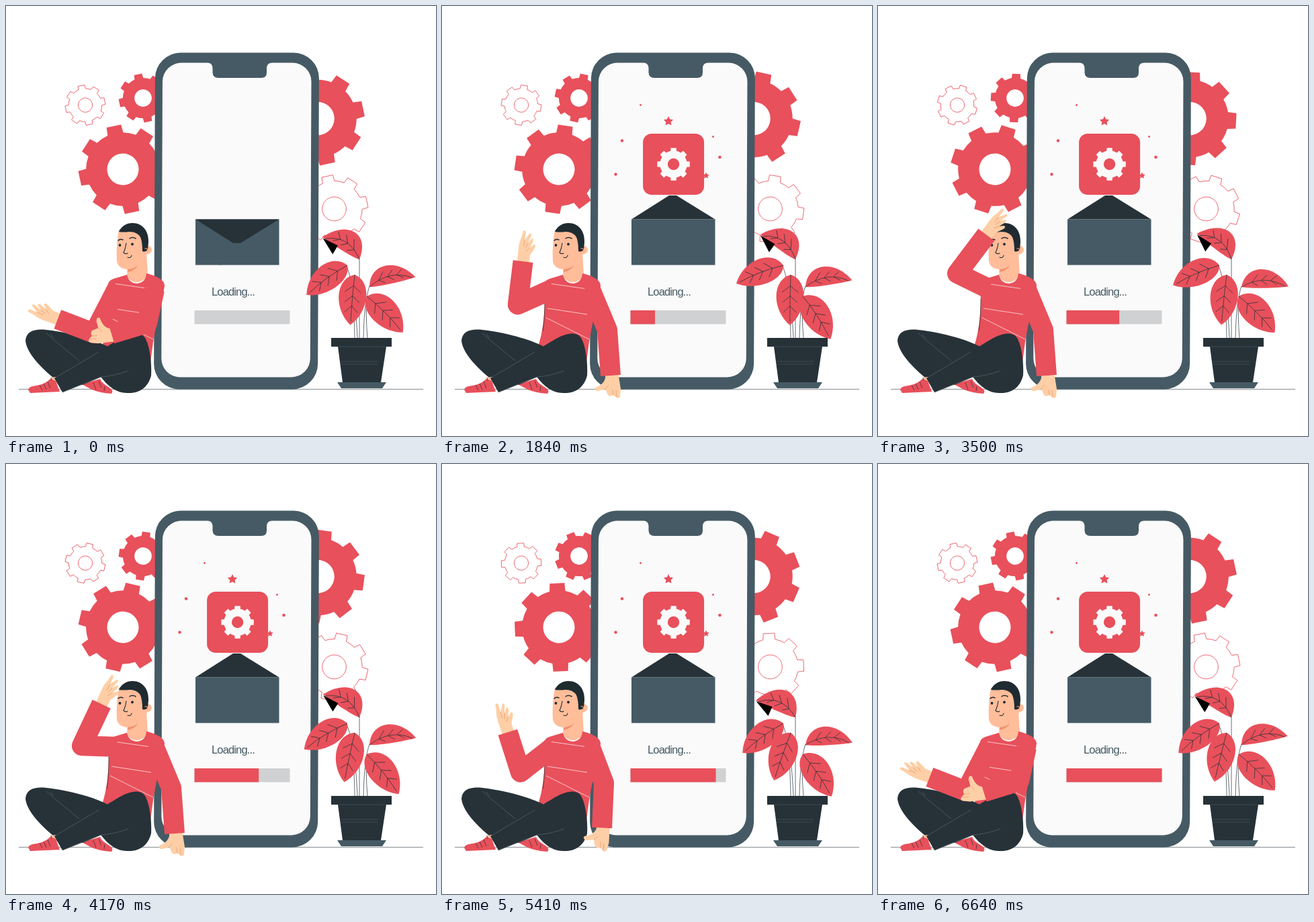
These frames come from a looping animation (640x640 px, 6670 ms). An HTML page:

```html
<!DOCTYPE html>
<html lang="en">
<head>
<meta charset="utf-8">
<title>Loading</title>
<style>
  html, body { margin: 0; width: 100%; height: 100%; overflow: hidden; background: #fff; }
  svg { display: block; width: 100vw; height: 100vh; }
  .red { fill: #e8505b; }
  .dark { fill: #263238; }
  .slate { fill: #455a64; }
  .screen { fill: #fafafa; }
  .skin { fill: #ffbd9a; }
  .hand { fill: #fecfa6; }
  .outline { fill: none; stroke: #e8505b; stroke-width: .8; }
  .thin { fill: none; stroke: #263238; stroke-width: .7; }
  .fold { fill: none; stroke: #fbd3d6; stroke-width: .9; }
  .seam { fill: none; stroke: #59656b; stroke-width: .7; }
  .crease { fill: none; stroke: #e99b70; stroke-width: .8; }
  .sleeve { fill: none; stroke: #e8505b; stroke-width: 30; stroke-linejoin: round; }
  text { font: 16.5px "Liberation Sans", Arial, sans-serif; letter-spacing: -.85px; fill: #455a64; }
</style>
</head>
<body>
<svg viewBox="0 0 640 640">
  <path d="M19 570.5H621" stroke="#a3a8ab" stroke-width="1.6"/>
  <g id="gears"></g>

  <!-- phone -->
  <g transform="skewX(-.23)">
    <rect class="slate" x="222.300" y="69.500" width="244" height="501" rx="38"/>
    <rect class="screen" x="233.400" y="84.500" width="221.500" height="468" rx="28"/>
  </g>
  <path class="slate" d="M300 84Q307 85 307.500 92V99Q308 107 316 107H380Q388 107 388 99V92Q388.500 85 396 84Z"/>

  <!-- envelope -->
  <g id="sparks"></g>
  <path id="flapBack" class="dark"/>
  <g id="icon">
    <rect class="red" x="-45.500" y="-45.500" width="91" height="91" rx="13"/>
    <path id="cog" class="screen" fill-rule="evenodd"/>
  </g>
  <path class="slate" d="M282 317.500H406.500V385.500H282Z"/>
  <path id="flapFront" class="dark"/>
  <text x="306" y="431.300">Loading...</text>
  <path fill="#d0d1d2" d="M280.500 453H422.500V473.500H280.500Z"/>
  <rect id="bar" class="red" x="280.500" y="453" height="20.500"/>

  <!-- plant -->
  <path class="thin" d="M526 494V376M519 494Q519 480 517 440M532 494Q533 440 541 417M538 494Q535 460 537 433M523 494Q520 420 507 387"/>
  <g id="leaves"></g>
  <path class="dark" d="M484 494H574V507H566L558 560H501L494 507H484Z"/>
  <path d="M498 529H554M499 533H553M495 507H565" stroke="#43525a" stroke-width=".7"/>
  <path class="slate" d="M493 560H566L560 569H499Z"/>

  <!-- seated man -->
  <path class="skin" d="M181 384L180 403Q194 420 211 402L209 366Z"/>
  <path d="M181 390Q190 392 197 384Q193 394 181 396Z" fill="#f0936f"/>
  <path class="red" d="M180 400Q183 413 196 413Q208 411 209 398C222 401 236 407 236 416C232 445 222 470 215 531L150 522L143 507C150 485 152 465 153 440L152 413Q154 408 160 406Z"/>
  <path class="fold" d="M163 413.500L212 420.500M157 450L216 459M155 464L219 496"/>
  <path class="thin" d="M153 436Q153 466 150 484"/>
  <path class="skin" d="M168 333C165 350 164 368 165 380Q167 391 181 392Q194 391 201 380Q207 372 211 369A6 6 0 0 0 211 357L206 335Z"/>
  <path fill="#1f2b31" d="M168 336C172 327 180 323 188 323C204 323 213 336 212 352L211 362Q208 367 203 365Q203 351 200 344Q195 336 184 336Q174 337 168 336Z"/>
  <g fill="none" stroke="#1f2b31" stroke-linecap="round" stroke-width="1.100">
    <path d="M167 349Q170 346 174 348M184 346Q188 343 193 346" stroke-width="1.500"/>
    <path d="M179 353Q178 361 175 367Q178 370 181 368M181 374Q186 376 187 371"/>
    <path d="M207 361Q211 360 211 365" stroke="#f0936f"/>
  </g>
  <g fill="#1f2b31"><circle cx="169.500" cy="356" r="1.900"/><circle cx="188" cy="354.500" r="1.900"/></g>

  <path class="red" d="M113 563L140 555C145 566 158 567 158.500 574L157 577Q140 576 128 571Z"/>
  <path class="dark" d="M29 498C30 484 43 480 60 482C95 486 130 496 150 506L170 540L114 564L75 557C60 545 31 520 29 498Z"/>
  <path class="skin" d="M66 553L74 552L78 562L68 562Z"/>
  <path class="red" d="M33 571Q34 566 45 565Q58 563 66 555L74 558L80 574L36 576Z"/>
  <path class="thin" d="M50 564L54 572M56 562L60 571M62 559L66 569M68 558L67 553M130 560L134 571M138 558L142 568M147 566L146 573"/>
  <path class="dark" d="M72 554L165 498C185 486 200 484 207 494C215 508 217 535 216 550C211 570 196 577 180 576C164 576 152 566 141 552L84 575Z"/>
  <path class="seam" d="M72 554L138 515M60 487Q66 492 70 496L109 528M66 488L70 494M84 575L141 552Q160 551 182 543"/>

  <g id="handL">
    <path class="hand" d="M-9 5L-8 -12Q-8 -28 -4 -36L-2 -45Q1 -48 2 -43L1 -32L8 -42Q12 -43 10 -38L6 -28L12 -35Q15 -34 13 -29L9 -21L15 -26Q19 -25 16 -20L10 -10L9 5Z"/>
    <path class="crease" d="M1 -32L0 -22M6 -28L3 -20M9 -21L4 -15"/>
  </g>
  <path id="armL" class="sleeve"/>
  <g id="handR">
    <path class="hand" d="M-8 -5L-8 4C-10 11 -15 15 -23 18Q-25 23 -18 23L-8 20L-4 29Q0 32 4 29L9 33Q13 35 14 31L15 20L11 -5Z"/>
    <path class="crease" d="M-8 20L-3 14M4 29L3 21M9 32L8 22"/>
  </g>
  <path id="armR" class="sleeve"/>
</svg>
<script>
const LOOP = 6670, SPIN_END = 6000, TURN = 2 * Math.PI;
const $ = id => document.getElementById(id);
const set = (el, attrs) => { for (const k in attrs) el.setAttribute(k, attrs[k]); };
const ramp = (t, a, b) => Math.max(0, Math.min(1, (t - a) / (b - a)));
const ease = (t, a, b) => (1 - Math.cos(Math.PI * ramp(t, a, b))) / 2;
const mix = (a, b, p) => a + (b - a) * p;
const at = (x, y, turn) => ({ transform: `translate(${x} ${y}) rotate(${turn})` });
const polar = (r, deg) => {
  const a = deg * TURN / 360;
  return `${(r * Math.sin(a)).toFixed(2)} ${(-r * Math.cos(a)).toFixed(2)}`;
};

// Eight-toothed wheel around the origin.
function gearPath(R) {
  const r = R * .825, hole = R * .353;
  let d = '';
  for (let a = 0; a < 360; a += 45) {
    d += (a ? `A${r} ${r} 0 0 1 ` : 'M') + polar(r, a - 12.5)
      + 'L' + polar(R, a - 9.5) + 'L' + polar(R, a + 9.5) + 'L' + polar(r, a + 12.5);
  }
  return d + `A${r} ${r} 0 0 1 ${polar(r, -12.5)}ZM0 ${-hole}A${hole} ${hole} 0 1 0 .01 ${-hole}Z`;
}

const gears = [
  { x: 118, y: 147.5, R: 30, dir: 1, cls: 'outline' },
  { x: 204, y: 137, R: 36.5, dir: -1, cls: 'red' },
  { x: 174, y: 243, R: 66.5, dir: 1, cls: 'red' },
  { x: 464, y: 167.5, R: 70, dir: -1, cls: 'red' },
  { x: 488.5, y: 302, R: 50.5, dir: 1, cls: 'outline' }
];
$('gears').innerHTML = gears.map(g =>
  `<path class="${g.cls}" fill-rule="evenodd" d="${gearPath(g.R)}"/>`).join('');
set($('cog'), { d: gearPath(24.5) });

// x, y, radius; the larger ones are stars
const sparks = [
  [337, 171.5, 7.5], [393, 252.5, 5], [309, 259, 8],
  [295.5, 147.5, 1.4], [268, 200.5, 2.2], [258.5, 250.5, 2.2],
  [379, 197.5, 1.5], [403.5, 194.5, 1.4], [413.5, 225, 2.3]
];
const star = r => 'M' + Array.from({ length: 10 }, (_, i) => polar(i % 2 ? r / 2 : r, i * 36)).join('L') + 'Z';
$('sparks').innerHTML = sparks.map(([, , r]) => r > 4
  ? `<path class="red" d="${star(r)}"/>` : `<circle class="red" r="${r}"/>`).join('');

// Blade along the x axis, reaching a below and b above it.
function blade(L, a, b) {
  const bend = (a - b) / 2;
  let veins = `M0 0Q${L * .5} ${bend * 1.6} ${L * .93} 0`;
  for (const f of [.22, .42, .62]) {
    const x = f * L, y = bend * 3.2 * f * (1 - f), reach = 1.1 - f * .5;
    for (const side of [a, -b]) veins += `M${x} ${y}L${x + L * .13} ${mix(y, side * reach, .6)}`;
  }
  const edge = h => `C${L * .1} ${h * 1.33} ${L * .7} ${h * 1.33} ${L} 0`;
  const back = h => `C${L * .7} ${h * 1.33} ${L * .1} ${h * 1.33} 0 0`;
  return `<path class="red" d="M0 0${edge(a)}${back(-b)}Z"/><path class="thin" d="${veins}"/>`;
}

const leaves = [
  { x: 526, y: 377, angle: 211, size: [64, 31, 2], extra: '<path d="M63 -1L38 1L38 -14Z"/>',
    sway: t => 6 * ease(t, 0, 2900) - 14 * ease(t, 3300, 5500) + 8 * ease(t, 5600, 6600) },
  { x: 508, y: 386, angle: 144, size: [75, 22, 16],
    sway: t => 18.5 * (ease(t, 0, 2600) - ease(t, 2600, 5000)) },
  { x: 519, y: 400, angle: 95, size: [75, 21, 20],
    sway: t => 19 * ease(t, 2300, 5600) - 4.5 * ease(t, 0, 2300) - 5.5 * ease(t, 5600, LOOP) },
  { x: 541, y: 418, angle: -12, size: [70, 2, 26],
    sway: t => 5.8 * (1 - Math.cos(TURN * t / 2300)) },
  { x: 537, y: 432, angle: 45, size: [76, 18, 23],
    sway: t => 6.2 * (1 - Math.cos(2 * TURN * t / LOOP)) }
];
$('leaves').innerHTML = leaves.map(l => `<g>${blade(...l.size)}${l.extra || ''}</g>`).join('');

function poseArm(side, shoulder, ex, ey, wx, wy, turn) {
  set($('arm' + side), { d: `M${shoulder}L${ex} ${ey}L${wx} ${wy}` });
  set($('hand' + side), at(wx, wy, turn));
}

// The elbow climbs while the forearm swings from the side up to the brow.
function raiseLeft(t) {
  const lift = ramp(t, 500, 3300);
  const angle = -69 + 92 * ease(t, 100, 2500) + 14 * ramp(t, 2500, 3300);
  const a = angle * TURN / 360, length = mix(58, 72, lift);
  const ex = mix(131, 118, lift) - 12 * Math.sin(Math.PI * lift), ey = mix(487, 398, lift);
  poseArm('L', '165 421', ex, ey, ex + length * Math.sin(a), ey - length * Math.cos(a), angle - 4);
}

// The other hand slides from the knee down to the floor.
function lowerRight(t) {
  const p = ease(t, 100, 1800);
  poseArm('R', '221 422', mix(210, 246, p), mix(472, 482, p) - 14 * Math.sin(Math.PI * p),
    mix(157, 251, p), mix(488, 550, p), 92 * (1 - p));
}

function draw(t) {
  const spin = Math.min(t, SPIN_END) * .06;
  gears.forEach((g, i) => set($('gears').children[i], at(g.x, g.y, g.dir * spin - 12)));

  const fly = ramp(t, 250, 900);
  sparks.forEach(([x, y], i) => set($('sparks').children[i], {
    transform: `translate(${mix(mix(344, x, .71), x, fly)} ${mix(300 + y * .32, y, fly)}) scale(${mix(.5, 1, fly)})`
  }));

  const open = 1 - 2 * ramp(t, 0, 500), tip = 317.5 + open * 35.5;
  const flap = `M282 317.500L338 ${tip}H349L406.500 317.500Z`;
  set($('flapFront'), { d: open > 0 ? flap : '' });
  set($('flapBack'), { d: open > 0 ? '' : flap });

  const grow = ramp(t, 500, 1330);
  set($('icon'), { transform: `translate(344.600 ${mix(337, 235.5, grow)}) scale(${grow})` });
  set($('bar'), { width: 142 * ramp(t, 400, SPIN_END) });

  leaves.forEach((l, i) => set($('leaves').children[i], at(l.x, l.y, l.angle + l.sway(t))));

  // The gesture runs back the way it came after the middle of the loop.
  const reach = Math.min(t, 6800 - t);
  raiseLeft(reach);
  lowerRight(reach);
}

function tick() {
  draw(performance.now() % LOOP);
  requestAnimationFrame(tick);
}
tick();
</script>
</body>
</html>
```
